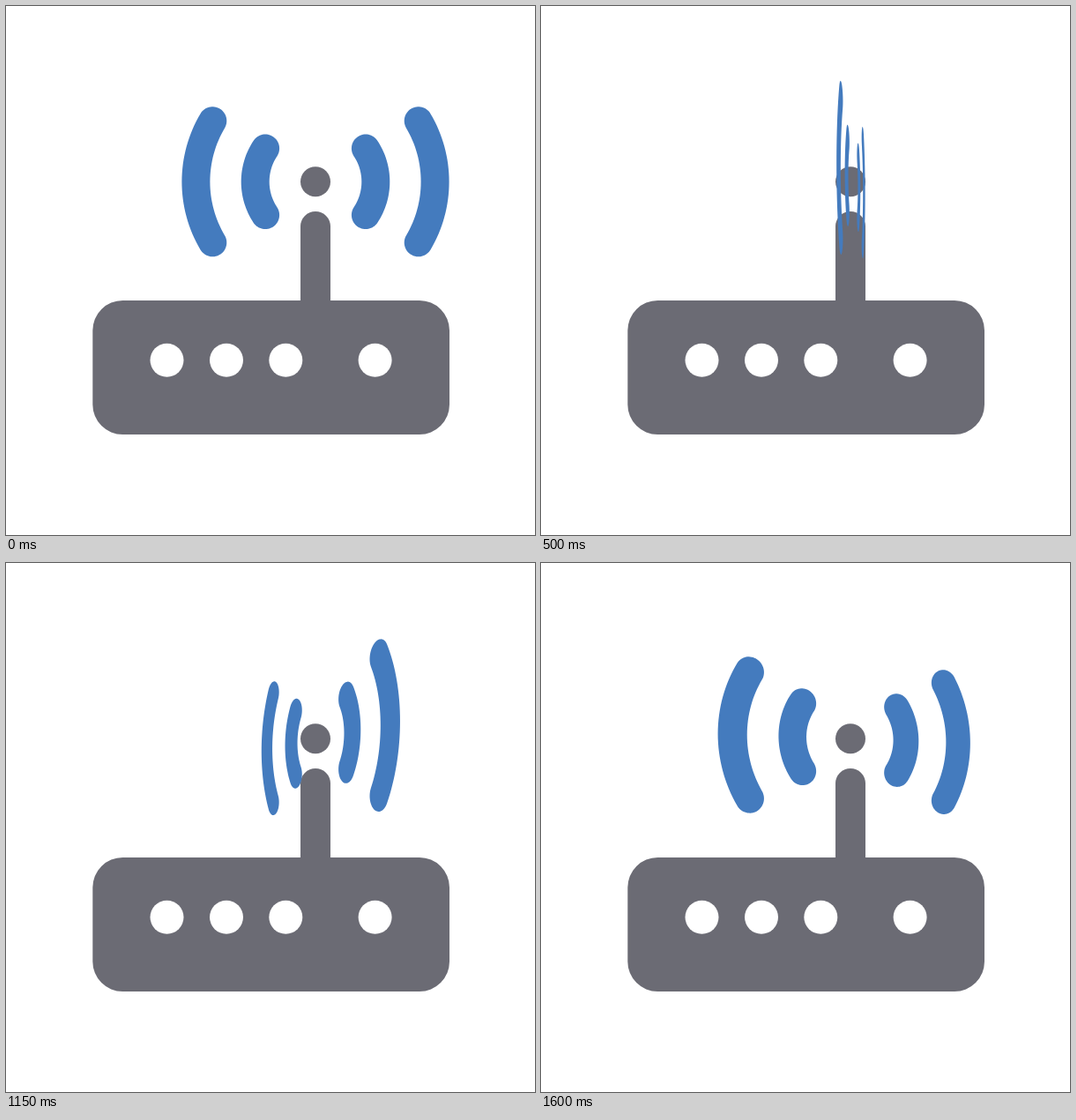
An HTML page with a canvas for the animation above (1.65 s loop, 600 by 600 pixels).

```html
<!DOCTYPE html>
<html lang="en">
<head>
<meta charset="utf-8">
<title>Router signal</title>
<style>
  html, body { margin: 0; width: 100%; height: 100%; overflow: hidden; background: #fff; }
  canvas { display: block; width: 600px; height: 600px; }
</style>
</head>
<body>
<canvas id="stage" width="600" height="600"></canvas>
<script>
const ctx = document.getElementById('stage').getContext('2d');
const GRAY = '#6b6b74', BLUE = '#447bbe';
const LOOP = 1650, STEP = 50, TURN = 1625;
const CAMERA = { x: 300, y: 300, distance: 2500 / 3 };
const PIVOT_X = 354;
const HUB = { x: 351, y: 199.3 };
const HALF_WIDTH = 16;
const WAVES = [
  { radius: 68.3, spread: 0.586 },
  { radius: 135.6, spread: 0.534 }
];

// Points along a circular arc from angle a to angle b.
function arcPoints(cx, cy, r, a, b, count = 32) {
  return Array.from({ length: count + 1 }, (_, i) => {
    const angle = a + (b - a) * i / count;
    return [cx + r * Math.cos(angle), cy + r * Math.sin(angle)];
  });
}

// Outline of a round-capped arc centred on the direction `facing`.
function waveOutline({ radius, spread }, facing) {
  const a = facing - spread, b = facing + spread;
  const cap = (angle, from) => arcPoints(
    HUB.x + radius * Math.cos(angle), HUB.y + radius * Math.sin(angle),
    HALF_WIDTH, from, from + Math.PI);
  return [
    ...arcPoints(HUB.x, HUB.y, radius + HALF_WIDTH, a, b),
    ...cap(b, b),
    ...arcPoints(HUB.x, HUB.y, radius - HALF_WIDTH, b, a),
    ...cap(a, a + Math.PI)
  ];
}

const outlines = WAVES.flatMap(w => [waveOutline(w, 0), waveOutline(w, Math.PI)]);

// Turn a flat point around the vertical pivot and view it in perspective.
function project([px, py], angle) {
  const u = px - PIVOT_X;
  const scale = CAMERA.distance / (CAMERA.distance - u * Math.sin(angle));
  const x = PIVOT_X + u * Math.cos(angle);
  return [CAMERA.x + (x - CAMERA.x) * scale, CAMERA.y + (py - CAMERA.y) * scale];
}

function disc(x, y, r, color) {
  ctx.fillStyle = color;
  ctx.beginPath();
  ctx.arc(x, y, r, 0, Math.PI * 2);
  ctx.fill();
}

function panel(x, y, w, h, radii) {
  ctx.fillStyle = GRAY;
  ctx.beginPath();
  ctx.roundRect(x, y, w, h, radii);
  ctx.fill();
}

function drawRouter() {
  panel(98.3, 334, 404.7, 152, 34);
  panel(334, 233, 34, 104, [17, 17, 0, 0]);
  disc(351, 199.3, 17, GRAY);
  for (const x of [182.5, 250, 317.3, 418.6]) disc(x, 401.7, 19, '#fff');
}

function drawWaves(angle) {
  ctx.fillStyle = BLUE;
  for (const outline of outlines) {
    ctx.beginPath();
    for (const point of outline) ctx.lineTo(...project(point, angle));
    ctx.closePath();
    ctx.fill();
  }
}

function draw(time) {
  // The flat pose is held for two steps at the start of each loop.
  const step = Math.max(0, Math.floor(time % LOOP / STEP) - 1);
  ctx.fillStyle = '#fff';
  ctx.fillRect(0, 0, 600, 600);
  drawRouter();
  drawWaves(step * STEP / TURN * Math.PI * 2);
}

let start;
function tick(now) {
  start ??= now;
  draw(now - start);
  requestAnimationFrame(tick);
}
draw(0);
requestAnimationFrame(tick);
</script>
</body>
</html>
```
